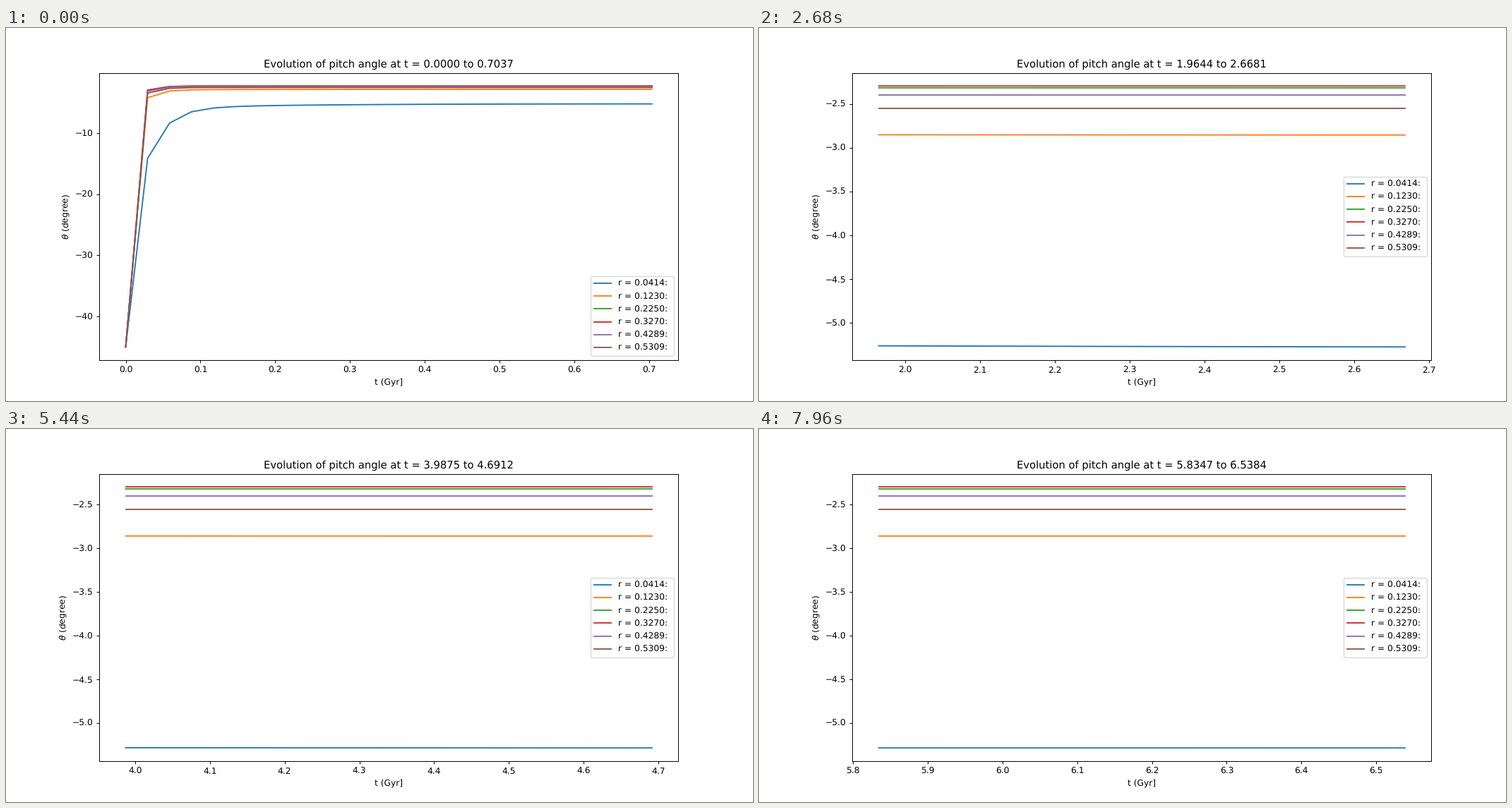
A matplotlib script for the animation above (8 s loop, 1058 by 529 pixels).

```python
import numpy as np
import matplotlib.pyplot as plt
from matplotlib.animation import FuncAnimation

FRAMES, INTERVAL = 200, 40
STEP = 0.02932   # Gyr between samples
SPAN = 25        # samples in the sliding window
START = -45      # every curve starts at this angle

# six radii spread over a grid of 25
RADII = np.linspace(0.04144, 0.53092, 25)[np.linspace(0, 24, 6).astype(int)]


def final_angle(r):
    """Size of the settled angle: steep core, then a gentle rise outwards."""
    x = r - 0.23
    return 0.152 / r + 1.62 + 1.07 * (x + np.hypot(x, 0.025))


def pitch(r, k):
    """Pitch angle in degrees at radius r and sample numbers k."""
    t = k * STEP
    final = final_angle(r)
    snap = 0.0554 * final ** 3 * (0.0585 * final) ** (k - 1.0)
    slow = 0.37 * np.exp(-19.4 * r - 0.95 * t)
    medium = 2.8 * np.exp(-26.3 * r - 5.1 * t)
    return np.where(k == 0, START, slow - medium - snap - final)


plt.rcParams["text.hinting"] = "no_hinting"
fig, ax = plt.subplots(figsize=(12, 6), dpi=1058 / 12)
fig.subplots_adjust(top=0.8796)
lines = [ax.plot([], [], label=f"r = {r:.4f}: ")[0] for r in RADII]
ax.set_xlabel("t (Gyr]")
ax.set_ylabel(r"$\theta$ (degree)")
title = ax.set_title("")
ax.legend(loc="best", labelspacing=0.54)


def update(frame):
    k = np.arange(frame, frame + SPAN)
    t = k * STEP
    for line, r in zip(lines, RADII):
        line.set_data(t, pitch(r, k))
    ax.relim()
    ax.autoscale_view()
    title.set_text(f"Evolution of pitch angle at t = {t[0]:.4f} to {t[-1]:.4f}")
    return [*lines, title]


anim = FuncAnimation(fig, update, frames=FRAMES, interval=INTERVAL,
                     init_func=lambda: update(0), repeat=True, repeat_delay=0)
plt.show()
```
